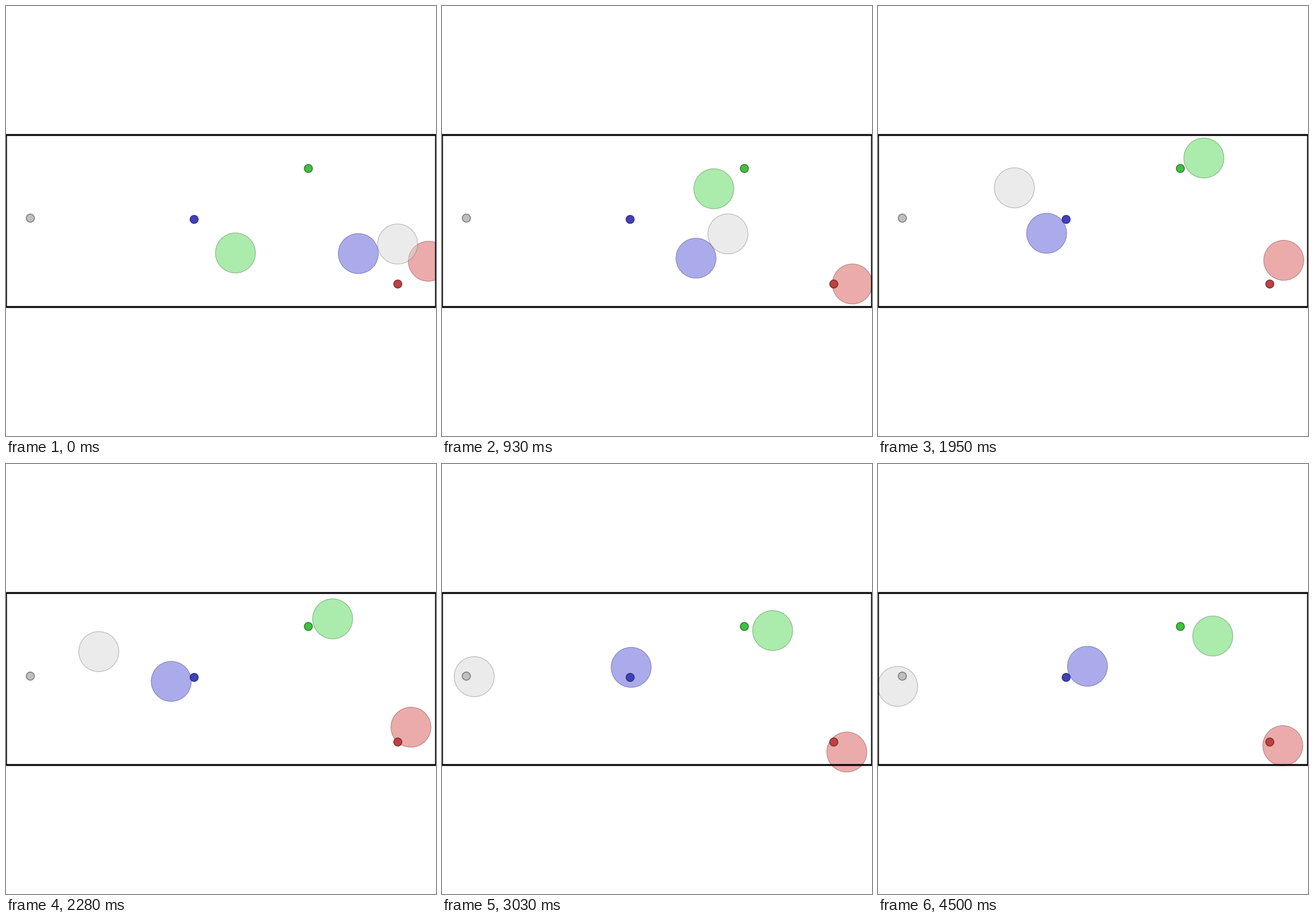
Animation, 700 px wide and 700 px high, one loop 4530 ms. Source, as a matplotlib script:

```python
import numpy as np
import matplotlib.pyplot as plt
from matplotlib.animation import FuncAnimation
from matplotlib.patches import Polygon, Rectangle

SIZE, DPI = 700, 100
FRAMES, INTERVAL = 151, 30
AGENT_R, MARK_R = 32.7, 6.6
PX = 72 / DPI

# Frames at which the agents pass their turning points; they rest after the last
TIMES = np.array([0, 31, 50, 65, 86, 92, 121])
HIGH, LOW = .85, .35

# Name: colour, target mark, turning points
TEAM = {
    "red": ((HIGH, LOW, LOW), (637.8, 452.6),
            [(687.5, 415.5), (668, 452.5), (668.5, 453.5), (660.5, 414),
             (659, 452), (659, 471), (659, 458.5)]),
    "green": ((LOW, HIGH, LOW), (492.2, 264.5),
              [(373.5, 402), (442.5, 297.5), (512.5, 247.5), (530.5, 247.5),
               (531, 258), (534, 265), (545, 280)]),
    "blue": ((LOW, LOW, HIGH), (306.3, 347.4),
             [(573.5, 403), (413.5, 410.5), (305, 382), (274.5, 370),
              (271, 338.5), (287, 333), (341, 329.3)]),
    "grey": ((HIGH, HIGH, HIGH), (39.6, 345.3),
             [(637.5, 387.5), (465.5, 371), (337.5, 326), (222, 296),
              (92, 321.5), (68, 335), (32, 362)]),
}


def glide(points, frame):
    """Position on a smooth curve that sets off gently and ends at rest."""
    p = np.array(points)
    speed = np.zeros_like(p)
    speed[0] = (p[1] - p[0]) / TIMES[1] / 2
    speed[1:-1] = (p[2:] - p[:-2]) / (TIMES[2:] - TIMES[:-2])[:, None]
    frame = min(frame, TIMES[-1])
    i = min(np.searchsorted(TIMES, frame, side="right"), len(p) - 1) - 1
    span = TIMES[i + 1] - TIMES[i]
    s = (frame - TIMES[i]) / span
    ease = s * s * (3 - 2 * s)
    return (p[i] + (p[i + 1] - p[i]) * ease
            + span * s * (1 - s) * (speed[i] * (1 - s) - speed[i + 1] * s))


angles = np.arange(30) * 2 * np.pi / 30
ring = np.column_stack([np.cos(angles), np.sin(angles)])

fig = plt.figure(figsize=(SIZE / DPI, SIZE / DPI), dpi=DPI, facecolor="white")
ax = fig.add_axes([0, 0, 1, 1])
ax.set_xlim(0, SIZE)
ax.set_ylim(SIZE, 0)
ax.axis("off")


def disc(center, radius, color, alpha, edge_alpha, width, z):
    edge = [c / 2 for c in color]
    shape = Polygon(np.add(center, radius * ring), closed=True,
                    fc=(*color, alpha), ec=(*edge, edge_alpha),
                    lw=width * PX, zorder=z)
    return ax.add_patch(shape)


agents = []
for z, (color, mark, points) in enumerate(TEAM.values()):
    agents.append((disc(points[0], AGENT_R, color, .5, .4, 1.2, z), points))
    mark_color = [c - .1 for c in color]
    disc(mark, MARK_R, mark_color, 1, .75, 1.5, 5)

ax.add_patch(Rectangle((0, 210), SIZE, 280, fill=False, ec="black",
                       lw=3 * PX, snap=False, zorder=6))


def update(frame):
    for shape, points in agents:
        shape.set_xy(glide(points, frame) + AGENT_R * ring)
    return [shape for shape, _ in agents]


anim = FuncAnimation(fig, update, frames=FRAMES, interval=INTERVAL,
                     repeat=True, repeat_delay=0, blit=False)
plt.show()
```
